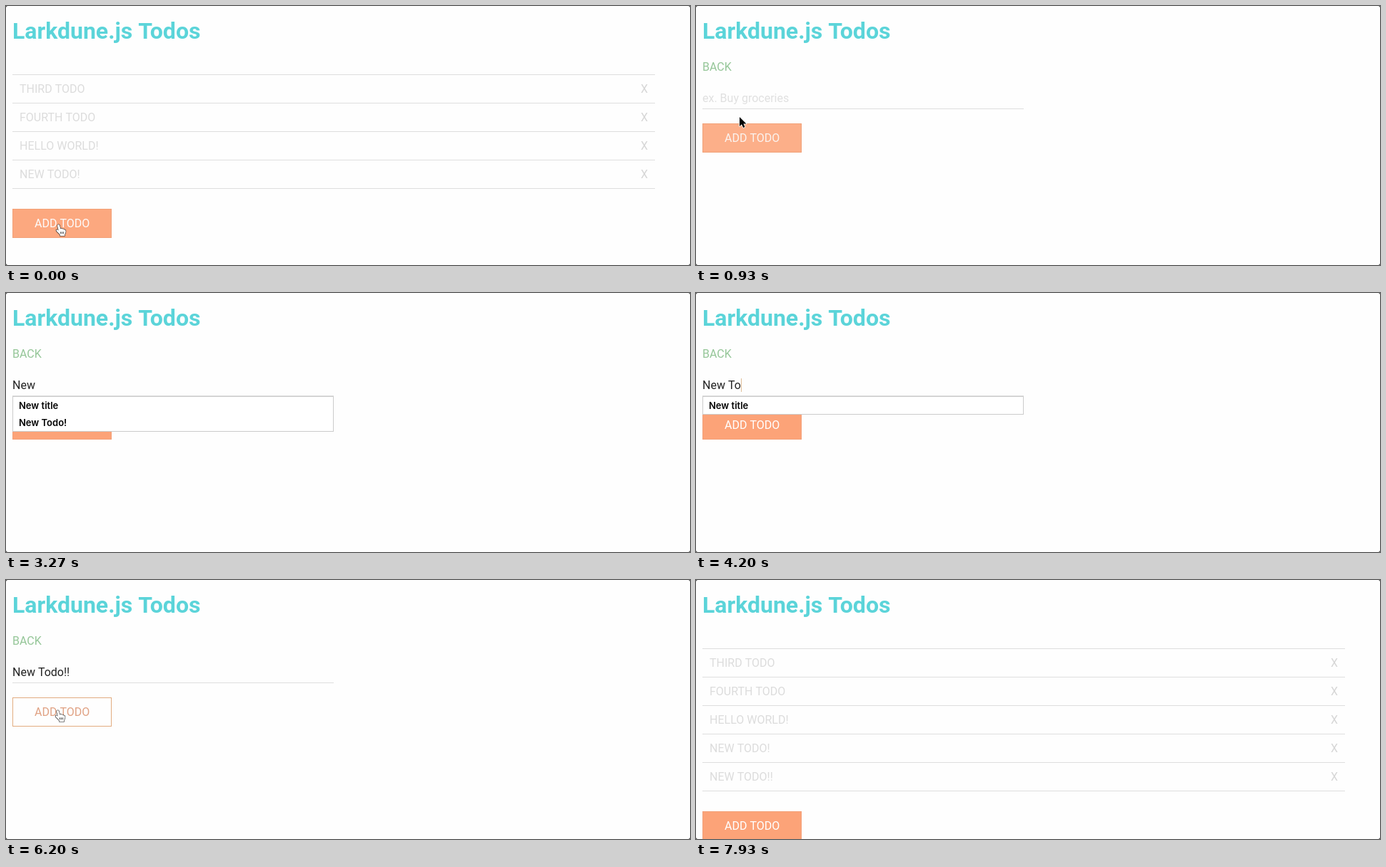
Write an HTML page with a canvas that moves like this. It is 958x364 px and loops after 8000 ms.

```html
<!DOCTYPE html>
<html lang="en">
<head>
<meta charset="utf-8">
<title>Todos</title>
<style>
  html, body { margin: 0; width: 100%; height: 100%; overflow: hidden; background: #fefefe; }
  canvas { display: block; width: 958px; height: 364px; }
</style>
</head>
<body>
<canvas id="stage"></canvas>
<script>
const W = 958, H = 364, LOOP = 8000;
const FORM_AT = 500, LIST_AT = 6400, FOCUS_AT = 1300;
const BODY = '400 16px Roboto, sans-serif';
const TITLE = '700 32px Roboto, sans-serif';
const MENU = '600 13px Inter, sans-serif';
const PAPER = [254, 254, 254], ORANGE = [252, 163, 120], INK = [224, 162, 132];

const canvas = document.getElementById('stage');
const ctx = canvas.getContext('2d');
const scale = window.devicePixelRatio || 1;
canvas.width = W * scale;
canvas.height = H * scale;

// Time of each key press, and how many suggestions are open from then on
const KEYS = [
  ['N', 2250, 4], ['e', 2450, 4], ['w', 2720, 2], [' ', 3600, 2], ['T', 3850, 2],
  ['o', 4100, 1], ['d', 4450, 1], ['o', 4700, 1], ['!', 5000, 1], ['!', 5500, 0]
];
const SUGGESTIONS = ['New title', 'New Todo!', 'Next todo', 'Note'];
const TODOS = ['THIRD TODO', 'FOURTH TODO', 'HELLO WORLD!', 'NEW TODO!', 'NEW TODO!!'];

const HOVER = [
  [0, .05], [70, .12], [300, 1], [499, 1], [500, 0], [755, 0], [862, .4], [930, .13], [1000, 0],
  [5700, 0], [5980, 1], [6399, 1], [6400, 0], [6580, 0], [6650, .3], [6790, 0]
];
const MOUSE_X = [[480, 74], [930, 61], [1150, 54], [5400, 54], [5850, 73], [6420, 73], [6720, 80]];
const MOUSE_Y = [[480, 308], [930, 156], [1150, 142], [5400, 143], [5850, 184], [6420, 184], [6720, 372]];

const smooth = u => u * u * (3 - 2 * u);
const linear = u => u;

function track(keys, t, ease) {
  if (t <= keys[0][0]) return keys[0][1];
  for (let i = 1; i < keys.length; i++) {
    const [t0, a] = keys[i - 1], [t1, b] = keys[i];
    if (t < t1) return a + (b - a) * ease((t - t0) / (t1 - t0));
  }
  return keys[keys.length - 1][1];
}

const mix = (a, b, u) => `rgb(${a.map((v, i) => Math.round(v + (b[i] - v) * u))})`;

function text(str, x, y, color, font = BODY) {
  ctx.font = font;
  ctx.fillStyle = color;
  ctx.fillText(str, x, y);
}

function rect(x, y, w, h, color) {
  ctx.fillStyle = color;
  ctx.fillRect(x, y, w, h);
}

function frame(x, y, w, h, color) {
  ctx.strokeStyle = color;
  ctx.lineWidth = 1;
  ctx.strokeRect(x + .5, y + .5, w - 1, h - 1);
}

function button(y, hover) {
  rect(9, y, 139, 41, mix(ORANGE, PAPER, hover));
  frame(9, y, 139, 41, mix([243, 160, 120], [226, 172, 128], hover));
  text('ADD TODO', 40, y + 26, mix([255, 255, 255], INK, hover));
}

function drawList(count, hover) {
  rect(9, 96, 900, 1, '#dedede');
  for (let i = 0; i < count; i++) {
    const y = 96 + i * 40;
    text(TODOS[i], 19, y + 26, '#dcdcdc');
    text('X', 889, y + 26, '#d6d6d6');
    rect(9, y + 40, 900, 1, '#dedede');
  }
  button(125 + count * 40, hover);
}

function drawForm(t, hover) {
  const typed = KEYS.filter(k => t >= k[1]);
  const last = typed[typed.length - 1];
  const value = typed.map(k => k[0]).join('');
  const rows = last ? last[2] : 0;

  text('BACK', 9, 91, '#95c698');
  text(value || 'ex. Buy groceries', 9, 135, value ? '#222' : '#e0e0e0');

  const since = t - (last ? last[1] : FOCUS_AT);
  if (since >= 0 && since % 1000 < 500) {
    ctx.font = BODY;
    rect(9 + Math.round(ctx.measureText(value).width), 120, 1, 19, '#dfbd98');
  }

  rect(9, 144, 450, 1, '#dedede');
  button(165, hover);

  if (rows) {
    const h = rows * 24 + 2;
    rect(9, 145, 450, h, '#fff');
    frame(9, 145, 450, h, '#cbcbcb');
    for (let i = 0; i < rows; i++) text(SUGGESTIONS[i], 18, 163 + i * 24, '#000', MENU);
  }
}

function outline(d, fill, stroke, width) {
  const path = new Path2D(d);
  ctx.lineJoin = 'round';
  ctx.lineWidth = width;
  ctx.strokeStyle = stroke;
  ctx.stroke(path);
  if (fill) {
    ctx.fillStyle = fill;
    ctx.fill(path);
  }
}

const POINTERS = {
  arrow() {
    outline('M0 0V13L3 10.3L5.2 15L7.5 14L5.4 9.5H9.5Z', '#000', '#fff', 1.5);
  },
  hand() {
    outline('M-2 1Q-2 -1 -.5 -1Q1 -1 1.3 1L2.2 5Q4 4 5 5.5Q6.8 4.8 7.5 6.4Q9.6 6 9.7 8.5' +
      'Q9.8 11 8.3 13V15H1.6V13.3L-3 8.8Q-4.4 7 -3 6.3Q-2 6 -.4 7.6Z', '#fff', '#111', 1.1);
    outline('M2.4 9.3V12.2M4.5 9.3V12.2M6.6 9.3V12.2', null, '#111', .8);
  },
  beam() {
    const d = 'M-3.5 -6.5Q-.5 -6.5 0 -5Q.5 -6.5 3.5 -6.5M0 -5V5M-3.5 6.5Q-.5 6.5 0 5Q.5 6.5 3.5 6.5M-2 2H2';
    outline(d, null, '#fff', 2.4);
    outline(d, null, '#111', 1.1);
  }
};

function drawPointer(t, onForm, buttonY) {
  if ((t > 2050 && t < 5250) || t > 6720) return;
  const x = track(MOUSE_X, t, smooth), y = track(MOUSE_Y, t, smooth);
  const onButton = x > 9 && x < 148 && y >= buttonY && y < buttonY + 41;
  const kind = onButton ? 'hand' : onForm && y > 113 && y < 145 ? 'beam' : 'arrow';
  ctx.save();
  ctx.translate(x, y);
  POINTERS[kind]();
  ctx.restore();
}

function corners() {
  for (const x of [0, W - 1]) for (const y of [0, H - 1]) rect(x, y, 1, 1, '#555');
  for (const x of [1, W - 2]) for (const y of [0, H - 1]) rect(x, y, 1, 1, '#bbb');
  for (const x of [0, W - 1]) for (const y of [1, H - 2]) rect(x, y, 1, 1, '#bbb');
}

function draw(t) {
  ctx.setTransform(scale, 0, 0, scale, 0, 0);
  rect(0, 0, W, H, '#fefefe');
  text('Larkdune.js Todos', 9, 46, '#5bd4d9', TITLE);

  const hover = track(HOVER, t, linear);
  const onForm = t >= FORM_AT && t < LIST_AT;
  const count = t < FORM_AT ? 4 : 5;
  if (onForm) drawForm(t, hover);
  else drawList(count, hover);

  drawPointer(t, onForm, onForm ? 165 : 125 + count * 40);
  corners();
}

const start = performance.now();
function tick() {
  draw((performance.now() - start) % LOOP);
  requestAnimationFrame(tick);
}
tick();
</script>
</body>
</html>
```
